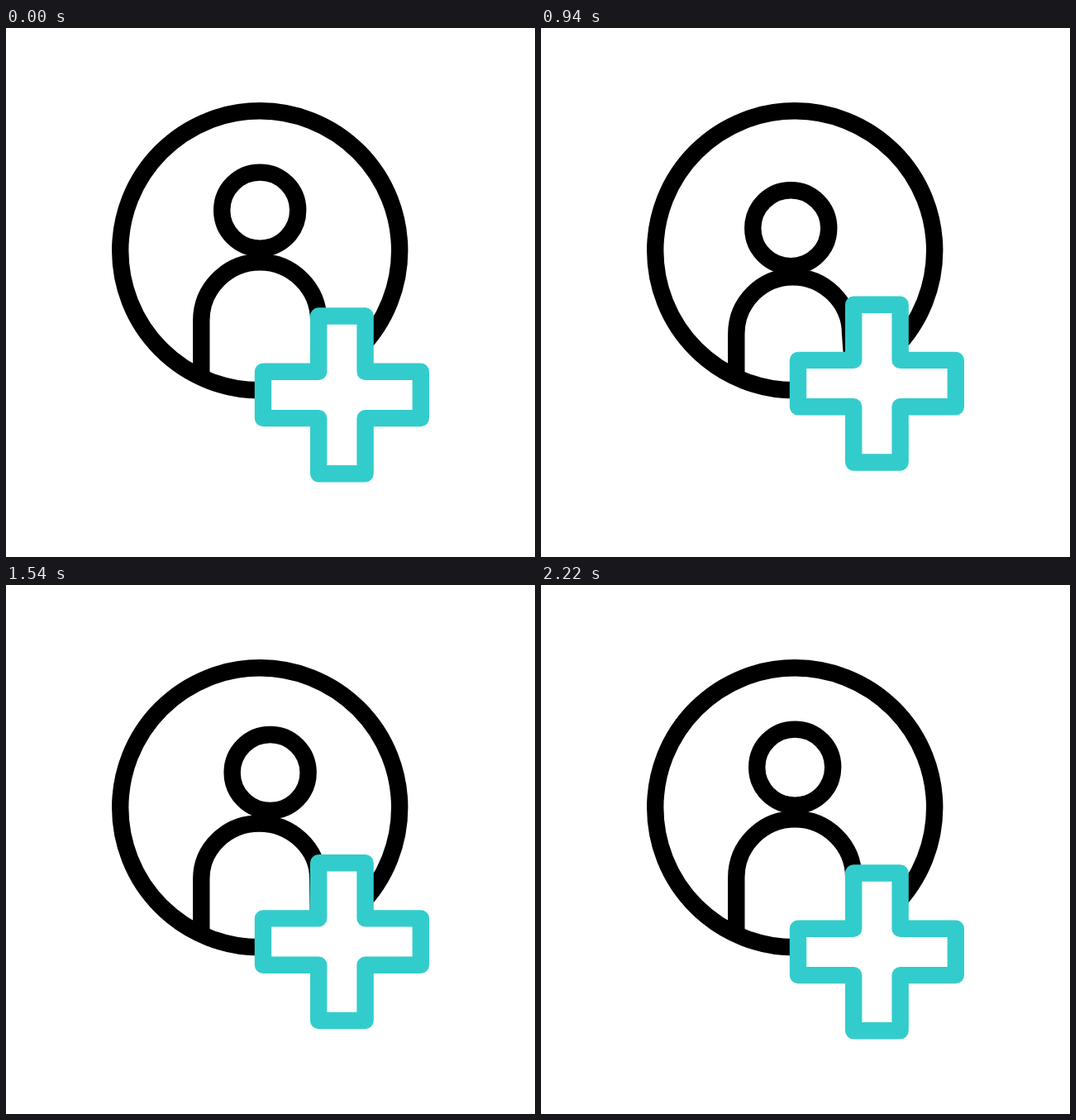
Recreate the animation shown at these times as an HTML page. Size 640x640 px, loop 2.4 s.

```html
<!DOCTYPE html>
<html lang="en">
<head>
<meta charset="utf-8">
<title>Add user</title>
<style>
  html, body { margin: 0; width: 100%; height: 100%; overflow: hidden; background: #fff; }
  svg { display: block; width: 100vw; height: 100vh; }
</style>
</head>
<body>
<svg viewBox="0 0 640 640" fill="none" stroke="#000" stroke-width="20.4">
  <circle cx="307.2" cy="269.3" r="169"/>
  <path id="body"/>
  <circle id="head" cx="307.2" cy="220.6" r="46"/>
  <path id="plus" fill="#fff" stroke="#33cccc" stroke-linejoin="round"
    d="M378.2 348.5h56.4v67.2h67.2v56.4h-67.2v67.2h-56.4v-67.2h-67.2v-56.4h67.2z"/>
</svg>
<script>
const LOOP = 2400, STEP = 20;
const el = id => document.getElementById(id);
const head = el('head'), body = el('body'), plus = el('plus');

const linear = p => p;
const inOut = p => (1 - Math.cos(Math.PI * p)) / 2;

// Cubic curve with a straight start and a soft end
function settle(p) {
  const curve = (u, a, b) => 3 * u * (1 - u) ** 2 * a + 3 * u * u * (1 - u) * b + u ** 3;
  let lo = 0, hi = 1;
  for (let i = 0; i < 24; i++) {
    const mid = (lo + hi) / 2;
    if (curve(mid, .167, .667) < p) lo = mid; else hi = mid;
  }
  return curve(lo, .167, 1);
}

// Pose: head x, head y, chest y, shoulder y, chest x, right shoulder x
const rest = [0, 0, 0, 0, 0, 0];
const left = [-36, 28, 23.3, 28, -3, -6];
const right = [28.7, 14.8, 12, 3, -2, -2];

// Each row: time, values, easing towards that row
const poses = [
  [200, rest],
  [700, left, settle],
  [1200, right, linear],
  [1800, rest, linear]
];
const lifts = [
  [200, [0]],
  [560, [26], settle],
  [700, [26], linear],
  [1200, [0], inOut],
  [1440, [26], settle],
  [1685, [0], settle],
  [1940, [26], settle],
  [2210, [0], settle]
];

function sample(rows, t) {
  const i = rows.findIndex(row => row[0] > t);
  if (i === 0) return rows[0][1];
  if (i < 0) return rows[rows.length - 1][1];
  const [t0, from] = rows[i - 1], [t1, to, ease] = rows[i];
  const p = ease((t - t0) / (t1 - t0));
  return from.map((v, k) => v + (to[k] - v) * p);
}

function torso(chestY, shoulderY, chestX, rightX) {
  const x0 = 236.3, x1 = 307.2 + chestX, x2 = 378.2 + rightX;
  const top = 283.3 + chestY, side = 354 + shoulderY;
  const k = .5523, rise = (side - top) * k;
  return `M${x0} 418V${side}` +
    `C${x0} ${side - rise} ${x1 - (x1 - x0) * k} ${top} ${x1} ${top}` +
    `S${x2} ${side - rise} ${x2} ${side}L378.2 425`;
}

function draw(t) {
  const [hx, hy, ...shape] = sample(poses, t);
  head.setAttribute('transform', `translate(${hx} ${hy})`);
  body.setAttribute('d', torso(...shape));
  plus.setAttribute('transform', `translate(0 ${-sample(lifts, t)[0]})`);
}

const start = performance.now();
function tick() {
  const t = (performance.now() - start) % LOOP;
  draw(Math.floor(t / STEP) * STEP);
  requestAnimationFrame(tick);
}
tick();
</script>
</body>
</html>
```
